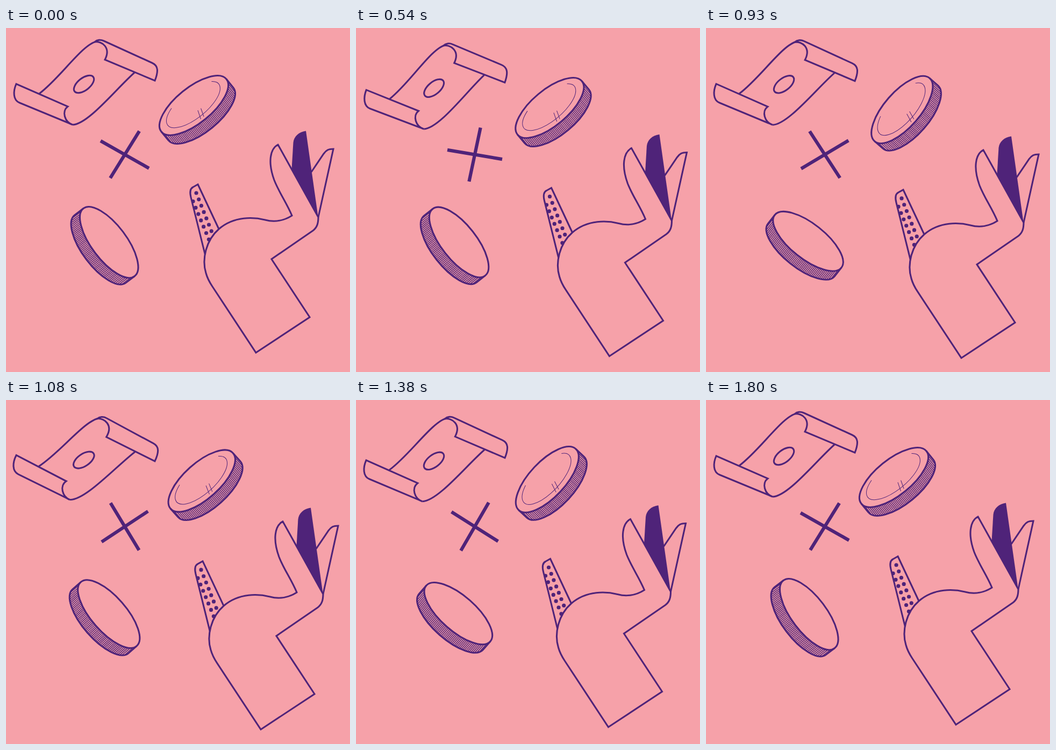
These frames come from a looping animation (640x640 px, 1830 ms). An HTML page:

```html
<!DOCTYPE html>
<html lang="en">
<head>
<meta charset="utf-8">
<title>Money toss</title>
<style>
  html, body { margin: 0; width: 100%; height: 100%; overflow: hidden; background: #f6a1a9; }
  svg { display: block; width: 100%; height: 100%; }
  .line { fill: none; stroke: #4f2379; stroke-width: 3.1; }
  .paper { fill: #f6a1a9; stroke: #4f2379; stroke-width: 3.1; }
  .solid { fill: #4f2379; }
  .hatch { fill: none; stroke: #4f2379; stroke-width: 1.5; }
  .thin { fill: none; stroke: #4f2379; stroke-width: 1; }
  .bar { stroke: #4f2379; stroke-width: 6.2; }
</style>
</head>
<body>
<svg viewBox="0 0 640 640">
  <defs>
    <clipPath id="thumbClip"><path d="M371 424L344 315C341 303 344 298 348 296L357 291L396 374V424Z"/></clipPath>
  </defs>

  <g id="note">
    <path class="line" d="M62 122C100 94 143 29 169 25M239 83C205 113 153 179 124 180"/>
    <path class="line" d="M165 26C178 24 196 36 184 59L277 98C284 80 283 70 272 65L182 24C176 21 169 22 165 26Z"/>
    <path class="line" d="M124 180C109 175 103 155 115 146L19 104C13 118 13 134 25 139L117 177Q121 179 124 180"/>
    <ellipse class="line" rx="22" ry="11.3" transform="translate(145 104.5) rotate(-38)"/>
  </g>

  <g id="coinRight">
    <g id="coinRightBody" transform="translate(349.5 144) rotate(-39)">
      <path class="thin" d="M53.5 -13.8A61 25 0 1 1 -35.5 -22.1M0 11.7L-6 28M6.7 12.5L1.2 28"/>
    </g>
  </g>
  <g id="coinLeft"><g id="coinLeftBody" transform="translate(191.7 398.7) rotate(53)"></g></g>

  <g id="cross">
    <path class="bar" d="M-51.7 0H51.7" transform="rotate(29.5)"/>
    <path class="bar" d="M-51.3 0H51.3" transform="rotate(121.8)"/>
  </g>

  <g id="hand">
    <g id="dots" class="solid" clip-path="url(#thumbClip)"></g>
    <path class="line" d="M371 424L344 315C341 303 344 298 348 296L357 291L396 374"/>
    <path class="paper" d="M465 604L565 538L494 430L571 377C579 371 581 363 581 352L506 217C491 225 487 250 499 283C508 306 522 325 532 349C518 358 500 362 482 357C462 352 425 349 396 374C372 395 364 430 372 456C375 467 380 475 384 481Z"/>
    <path class="line" d="M581 352L609 225C600 225 596 227 591 234L568 268"/>
    <path class="solid" d="M558 191.5C545 193 535.5 202 534.5 213L531.5 263L581 354Z"/>
  </g>
</svg>
<script>
const LOOP = 1830, STEP = 30;
const byId = id => document.getElementById(id);

function add(parent, tag, attrs) {
  const node = document.createElementNS('http://www.w3.org/2000/svg', tag);
  for (const key in attrs) node.setAttribute(key, attrs[key]);
  parent.append(node);
}

// Face ellipse plus its extruded, hatched rim, in the coin's own axes.
function buildCoin(body, rx, ry, depth) {
  let hatch = '';
  for (let x = -rx + 2; x < rx - 1; x += 2.9) {
    const y = ry * Math.sqrt(1 - (x / rx) ** 2);
    hatch += `M${x.toFixed(1)} ${y.toFixed(1)}v${depth}`;
  }
  add(body, 'path', { class: 'hatch', d: hatch });
  add(body, 'path', { class: 'line', d: `M${-rx} 0V${depth}A${rx} ${ry} 0 0 0 ${rx} ${depth}V0` });
  add(body, 'ellipse', { class: 'line', rx, ry });
}

function buildDots(group) {
  for (let i = 0; i < 7; i++) {
    add(group, 'circle', { cx: 354 + 4.7 * i, cy: 307 + 11.8 * i, r: 3.6 });
    add(group, 'circle', { cx: 348 + 4.9 * i, cy: 322.5 + 11.8 * i, r: 3.6 });
  }
}

const ease = x => x * x * (3 - 2 * x);

// Eased value of a list of [time, value] keys.
function track(t, keys) {
  for (let i = 1; i < keys.length; i++) {
    const [t0, v0] = keys[i - 1], [t1, v1] = keys[i];
    if (t <= t1) return v0 + (v1 - v0) * ease((t - t0) / (t1 - t0));
  }
  return keys[keys.length - 1][1];
}

function draw(t) {
  const slow = Math.min(t, 1800), fast = Math.min(t, 1770);
  const half = slow % 900;
  const drift = track(slow, [[0, 0], [900, 1], [1800, 0]]);
  const rock = track(fast % 590, [[0, 0], [295, 1], [590, 0]]);
  const tilt = track(half, [[0, 0], [300, 5.9], [600, -2.6], [900, 0]]);
  const drop = track(half, [[0, 0], [300, 11.3], [900, 0]]);
  const spin = track(fast, [[0, 0], [1770, 720]]);
  const set = (id, value) => byId(id).setAttribute('transform', value);

  set('hand', `translate(${10 * drift} ${10 * drift})`);
  set('note', `translate(0 ${drop}) rotate(${tilt} 148 101)`);
  set('coinRight', `translate(${17 * drift} ${7 * drift}) rotate(${-10.5 * rock} 354.5 154)`);
  set('coinLeft', `rotate(${-15.6 * rock} 183.5 404.5)`);
  set('cross', `translate(221 235.5) rotate(${spin})`);
}

buildCoin(byId('coinRightBody'), 77.8, 33.2, 20.5);
buildCoin(byId('coinLeftBody'), 79, 32.5, 20.5);
buildDots(byId('dots'));

const start = performance.now();
function frame() {
  const t = (performance.now() - start) % LOOP;
  draw(Math.floor(t / STEP) * STEP);
  requestAnimationFrame(frame);
}
draw(0);
requestAnimationFrame(frame);
</script>
</body>
</html>
```
